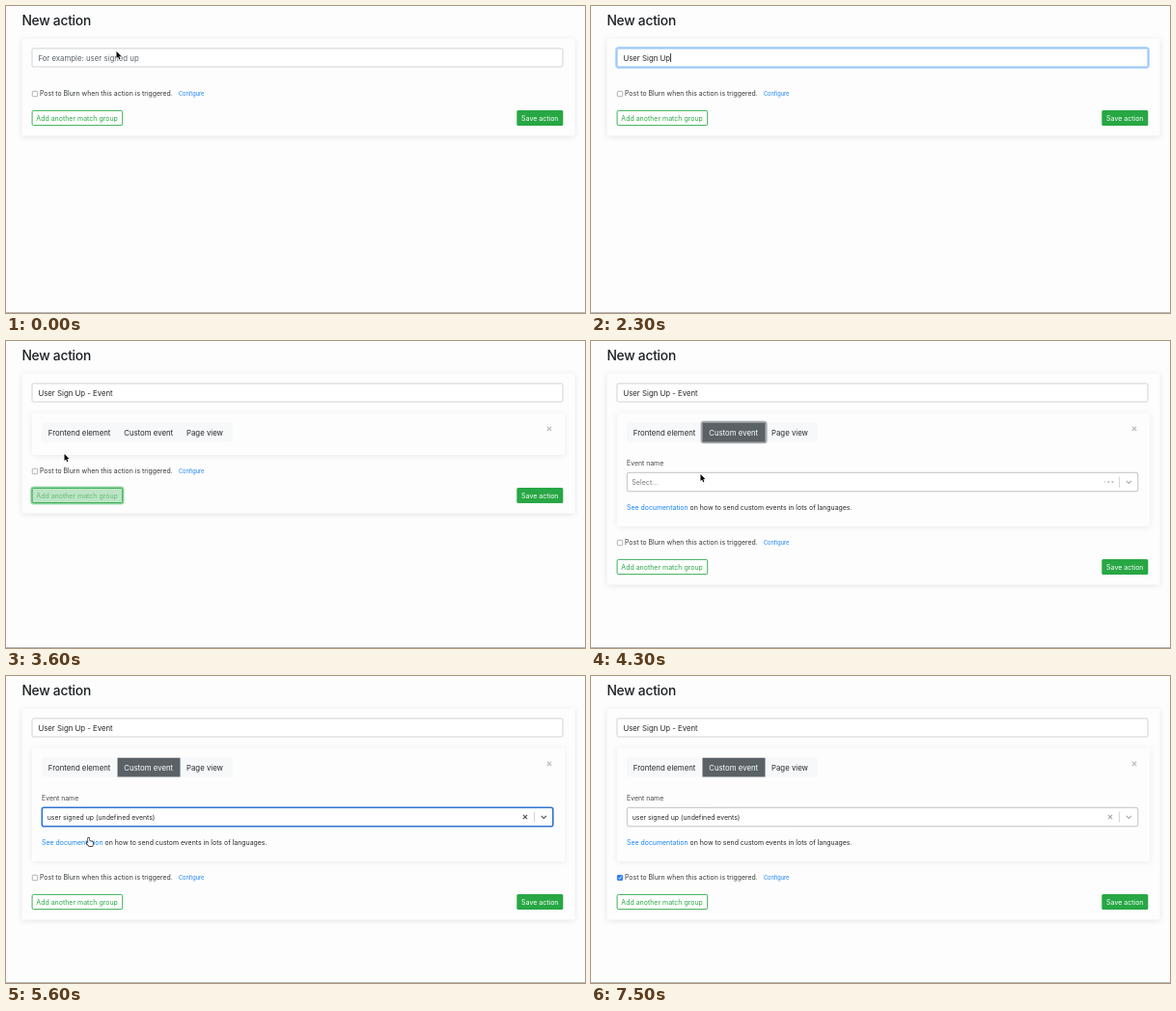
An HTML page with a canvas that plays this animation: 600 by 318 pixels, repeating every 7600 ms.

```html
<!DOCTYPE html>
<html lang="en">
<head>
<meta charset="utf-8">
<title>New action</title>
<style>
  html, body { margin: 0; width: 100%; height: 100%; overflow: hidden; background: #fdfdfd; }
  canvas { display: block; width: 600px; height: 318px; }
</style>
</head>
<body>
<canvas id="stage"></canvas>
<script>
const W = 600, H = 318, LOOP = 7600, STEP = 100;
const PAGE = '#fdfdfd', INK = '#26292c', GREEN = '#28a745', LINK = '#1583f5', FOCUS = '#2f74d0';
const canvas = document.getElementById('stage');
const ctx = canvas.getContext('2d');
const dpr = window.devicePixelRatio || 1;
canvas.width = W * dpr;
canvas.height = H * dpr;
ctx.scale(dpr, dpr);

const EVENTS = ['created superuser', '$identify', '$pageleave', 'ph_page_view',
  'someevent', 'superuser created', 'user logged in', 'user signed up']
  .map(name => name + ' (undefined events)');

// [start time, value]
const TITLE = [[0, ''], [700, 'U'], [800, 'Us'], [900, 'User'], [1100, 'User '], [1300, 'User S'],
  [1500, 'User Si'], [1700, 'User Sig'], [1800, 'User Sign'], [2100, 'User Sign '],
  [2200, 'User Sign U'], [2300, 'User Sign Up'], [2500, 'User Sign Up -'], [2700, 'User Sign Up - E'],
  [2800, 'User Sign Up - Ev'], [2900, 'User Sign Up - Eve'], [3000, 'User Sign Up - Even'],
  [3100, 'User Sign Up - Event']];
const QUERY = [[0, ''], [4900, 'S'], [5000, 'Si'], [5100, 'Sig']];

// Pointer paths: [time, x, y]
const PATHS = [
  [[0, 114.5, 47], [100, 112, 48], [400, 92, 53], [600, 90, 54]],
  [[3300, 78, 96], [3500, 62, 115], [3600, 60.5, 117], [3900, 140, 96], [4000, 144, 95],
    [4300, 113.5, 138], [4400, 112, 146], [4800, 112, 147]],
  [[5300, 104, 150], [5600, 86, 168], [6000, 31, 207], [6400, 30, 207]],
  [[6500, 40, 205], [6900, 215, 186], [7200, 425, 150], [7300, 420, 170]]
];

const valueAt = (keys, t) => keys.filter(k => k[0] <= t).pop()[1];

function pointerAt(t) {
  const path = PATHS.find(p => t >= p[0][0] && t <= p[p.length - 1][0]);
  if (!path) return null;
  const i = Math.max(1, path.findIndex(k => k[0] >= t));
  const a = path[i - 1], b = path[i];
  const u = (t - a[0]) / (b[0] - a[0]);
  return [a[1] + (b[1] - a[1]) * u, a[2] + (b[2] - a[2]) * u];
}

function text(str, x, y, size, color = INK, weight = 400, align = 'left') {
  ctx.font = `${weight} ${size}px Inter, "Open Sans", sans-serif`;
  ctx.textAlign = align;
  ctx.textBaseline = 'alphabetic';
  ctx.fillStyle = color;
  ctx.fillText(str, x, y);
  return ctx.measureText(str).width;
}

function box(x, y, w, h, r, fill, stroke, line = 1) {
  ctx.beginPath();
  ctx.roundRect(x, y, w, h, r);
  if (fill) { ctx.fillStyle = fill; ctx.fill(); }
  if (stroke) { ctx.strokeStyle = stroke; ctx.lineWidth = line; ctx.stroke(); }
}

function card(x, y, w, h, alpha) {
  ctx.save();
  ctx.shadowColor = `rgba(0,0,0,${alpha})`;
  ctx.shadowBlur = 6 * dpr;
  ctx.shadowOffsetY = dpr;
  box(x, y, w, h, 1, PAGE);
  ctx.restore();
}

function line(points, color, width) {
  ctx.beginPath();
  points.forEach(([x, y], i) => i ? ctx.lineTo(x, y) : ctx.moveTo(x, y));
  ctx.strokeStyle = color;
  ctx.lineWidth = width;
  ctx.stroke();
}

function cross(x, y, r, color, width) {
  line([[x - r, y - r], [x + r, y + r]], color, width);
  line([[x - r, y + r], [x + r, y - r]], color, width);
}

function caret(x, y) {
  ctx.fillStyle = '#111';
  ctx.fillRect(x, y - 4.5, 0.8, 9);
}

function titleField(t) {
  const focus = t >= 400 && t < 3500;
  if (focus) box(26.5, 43.5, 551, 20, 2.5, null, '#b9d8fb', 3);
  box(27, 44, 550, 19, 1.5, '#fff', focus ? '#80b5f5' : '#c9ced3', 0.9);
  const str = valueAt(TITLE, t);
  const width = text(str || 'For example: user signed up', 33.4, 56.6, 7.8, str ? INK : '#5c6369');
  if (focus) caret(33.6 + (str ? width : 0), 53.6);
}

function tabs(t) {
  box(37, 84.5, 198, 20, 1.5, '#f7f8f9');
  const active = t >= 4000;
  if (active) {
    if (t < 4400) box(114.8, 84, 66.6, 21, 2, null, '#a9acae', 2.4);
    box(115.5, 84.7, 65, 19.8, 0, '#5a6268');
  }
  text('Frontend element', 43.8, 97.6, 7.8);
  text('Custom event', 122.2, 97.6, 7.8, active ? '#fff' : INK);
  text('Page view', 187, 97.6, 7.8);
}

function select(t) {
  const focus = t >= 4400 && t < 6100, chosen = t >= 5300;
  const query = chosen ? '' : valueAt(QUERY, t);
  text('Event name', 37, 129.2, 6.9, '#45494d');
  box(37.3, 136.3, 529.5, 19.5, 2, '#fff', focus ? FOCUS : '#bfc2c5', focus ? 1.6 : 1);

  if (chosen) text(EVENTS[7], 42.7, 148.6, 6.9);
  else if (query) caret(42.9 + text(query, 42.5, 148.6, 7.4), 146);
  else {
    text('Select...', 42.3, 148.7, 7.1, '#777');
    if (focus) caret(42, 146);
  }

  const dark = focus ? '#555' : '#aaa';
  if (chosen) cross(538, 146, 2.1, dark, 1.2);
  if (!chosen && t < 4900) {
    const lit = Math.floor(t / 200) % 3;
    for (let i = 0; i < 3; i++) {
      ctx.beginPath();
      ctx.arc(532.4 + i * 4, 146, 1, 0, 7);
      ctx.fillStyle = i === lit ? '#ddd' : '#b5b5b5';
      ctx.fill();
    }
  }
  line([[547.5, 140.5], [547.5, 151.5]], '#ccc', 0.8);
  line([[554.7, 144.9], [557.3, 147.4], [559.9, 144.9]], dark, 1.2);

  const width = text('See documentation', 37, 175.4, 6.95, LINK);
  text(' on how to send custom events in lots of languages.', 37 + width, 175.4, 6.95);
}

function menu(t) {
  if (t < 4500 || t >= 5300) return;
  const query = valueAt(QUERY, t).toLowerCase();
  const rows = query ? EVENTS.filter(name => name.includes(query)) : [];
  const height = rows.length > 1 ? 152.5 : 20;
  ctx.save();
  ctx.shadowColor = 'rgba(0,0,0,.22)';
  ctx.shadowBlur = 4 * dpr;
  ctx.shadowOffsetY = dpr;
  box(37, 162, 530, height, 2, '#fff');
  ctx.restore();
  box(37, 162, 530, height, 2, null, '#c4c6c9', 0.7);
  if (!rows.length) return text('Loading...', 302, 174.6, 6.9, '#999', 400, 'center');
  ctx.save();
  ctx.beginPath();
  ctx.rect(37, 162, 530, height);
  ctx.clip();
  ctx.fillStyle = '#d9e5fb';
  ctx.fillRect(37.4, 162.3, 529.2, 19.3);
  rows.forEach((name, i) => text(name, 43.2, 174.5 + i * 19.57, 6.9, '#33373a'));
  ctx.restore();
}

function checkbox(y, on) {
  box(27.3, y - 2.7, 5.4, 5.4, 1, on ? '#2678f2' : '#fff', on ? '#2678f2' : '#8e8e8e', 0.7);
  if (on) line([[28.6, y], [29.7, y + 1.3], [31.5, y - 1.5]], '#fff', 0.9);
  text('Post to Blurn when this action is triggered.', 35, y + 2.4, 6.9, '#33373a');
  text('Configure', 179, y + 2.3, 5.65, LINK);
}

function buttons(y, t) {
  let fill = '#fff', ink = GREEN;
  if (t === 3500) { fill = GREEN; ink = '#fff'; }
  if (t === 3600) { fill = '#bde5c5'; ink = '#67b979'; }
  if (t >= 3500 && t < 4000) box(26.6, y - 8.2, 94.6, 16.4, 2, null, '#9ed8ab', 2.6);
  box(27.1, y - 7.6, 93.6, 15.2, 1.4, fill, GREEN, 0.9);
  text('Add another match group', 31.3, y + 2.6, 7, ink);
  box(529.3, y - 8, 48, 16, 1.5, GREEN);
  text('Save action', 553.3, y + 2.6, 7, '#fff', 400, 'center');
}

function shape(points, x, y, fill, stroke, width) {
  ctx.beginPath();
  points.forEach(([px, py], i) => i ? ctx.lineTo(x + px, y + py) : ctx.moveTo(x + px, y + py));
  ctx.closePath();
  ctx.lineJoin = 'round';
  ctx.strokeStyle = stroke;
  ctx.lineWidth = width;
  ctx.stroke();
  ctx.fillStyle = fill;
  ctx.fill();
  ctx.lineJoin = 'miter';
}

function pointer(t) {
  const pos = pointerAt(t);
  if (!pos) return;
  const [x, y] = pos;
  const overLink = t >= 5500 && y > 166 && y < 176 && x < 102;
  if (overLink) {
    shape([[-1, 0], [0.3, 0], [0.6, 3], [3.8, 3.7], [4.3, 4.6], [3.6, 8], [0, 8], [-2.6, 5], [-2, 4.2], [-0.8, 5]],
      x, y, '#fff', '#111', 1.3);
  } else if (t >= 300 && t <= 600) {
    line([[x - 1.3, y - 4], [x, y - 3.5], [x + 1.3, y - 4]], '#222', 0.7);
    line([[x, y - 3.5], [x, y + 3.5]], '#222', 0.8);
    line([[x - 1.3, y + 4], [x, y + 3.5], [x + 1.3, y + 4]], '#222', 0.7);
  } else {
    shape([[0, 0], [0, 7], [1.6, 5.6], [2.8, 8.2], [3.9, 7.7], [2.8, 5.2], [4.9, 5]],
      x, y, '#000', '#fff', 1);
  }
}

function draw(t) {
  const grow = t >= 4000 ? 118 : t >= 3500 ? 44 : 0;
  ctx.fillStyle = PAGE;
  ctx.fillRect(0, 0, W, H);
  ctx.letterSpacing = '-0.25px';
  text('New action', 16.4, 20, 13.8, '#1d2023', 500);
  ctx.letterSpacing = '0px';

  card(16.5, 33.5, 573, 101 + grow, 0.1);
  titleField(t);
  if (grow) {
    card(27, 74.5, 552, grow - 0.5, 0.08);
    cross(563, 90.8, 2.2, '#bbb', 1.1);
    tabs(t);
  }
  if (t >= 4000) select(t);
  checkbox(91 + grow, t >= 6100);
  buttons(116 + grow, t);
  menu(t);

  ctx.fillStyle = '#b8b8b8';
  ctx.fillRect(0, 317, W, 1);
  pointer(t);
}

const start = performance.now();
function tick() {
  const t = (performance.now() - start) % LOOP;
  draw(Math.floor(t / STEP) * STEP);
  requestAnimationFrame(tick);
}
tick();
</script>
</body>
</html>
```
